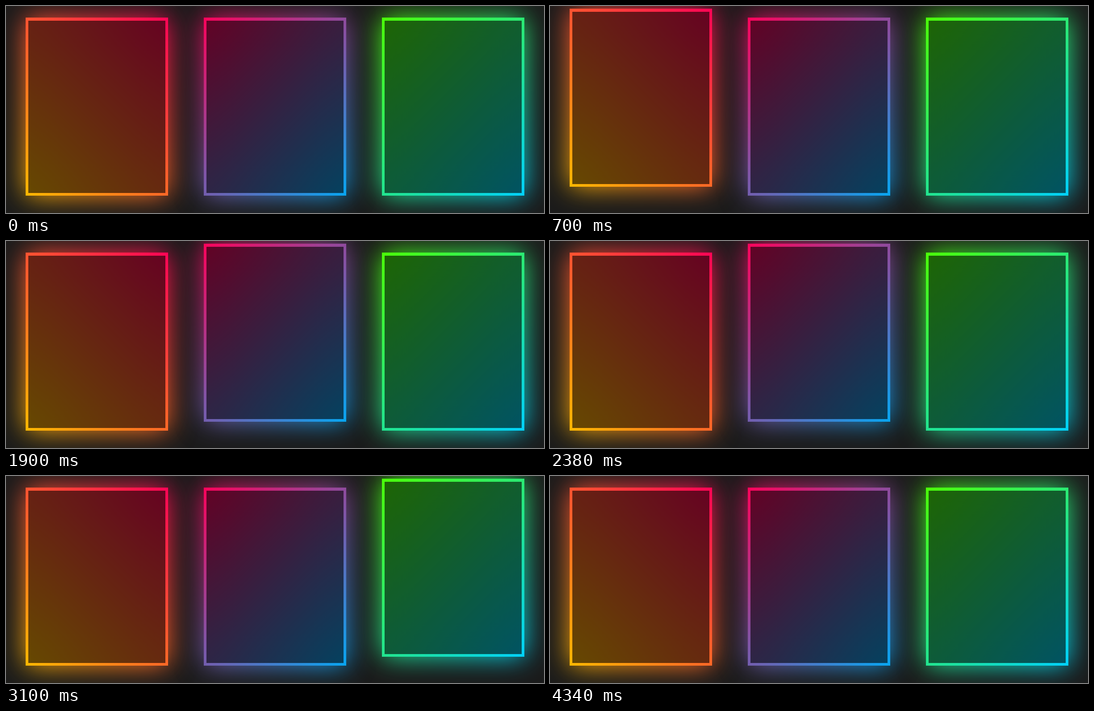
An HTML page that plays this animation: 1205x465 px, repeating every 4700 ms.

```html
<!DOCTYPE html>
<html lang="en">
<head>
<meta charset="utf-8">
<title>Glowing cards</title>
<style>
  html, body {
    margin: 0;
    width: 100%;
    height: 100%;
    overflow: hidden;
    background: #1b1b1b;
  }
  .card {
    position: absolute;
    top: 26px;
    width: 319px;
    height: 400px;
  }
  .card::before, .card::after {
    content: "";
    position: absolute;
    inset: 0;
    background: var(--paint);
  }
  .card::after { filter: blur(30px); }
  .card span {
    position: absolute;
    inset: 7px 6px 6px;
    background: rgba(0, 0, 0, 0.6);
    z-index: 2;
  }
  .warm { left: 44px; --paint: linear-gradient(45deg, #ffbc00, #ff0058); }
  .cool { left: 443px; --paint: linear-gradient(315deg, #03a9f4, #ff0058); }
  .lime { left: 842px; --paint: linear-gradient(315deg, #00d0ff, #4dff03); }
</style>
</head>
<body>
<div class="card warm"><span></span></div>
<div class="card cool"><span></span></div>
<div class="card lime"><span></span></div>
<script>
  const LOOP = 4700;
  const RAISED_TOP = 6;
  const REST_TOP = 26;
  // Start and end of each card's raised pose, in ms
  const lifts = [[700, 1400], [1900, 2700], [3100, 3800]];
  const cards = document.querySelectorAll('.card');
  const start = performance.now();

  function draw() {
    const t = (performance.now() - start) % LOOP;
    cards.forEach((card, i) => {
      const [from, to] = lifts[i];
      card.style.top = (t >= from && t < to ? RAISED_TOP : REST_TOP) + 'px';
    });
    requestAnimationFrame(draw);
  }
  draw();
</script>
</body>
</html>
```
